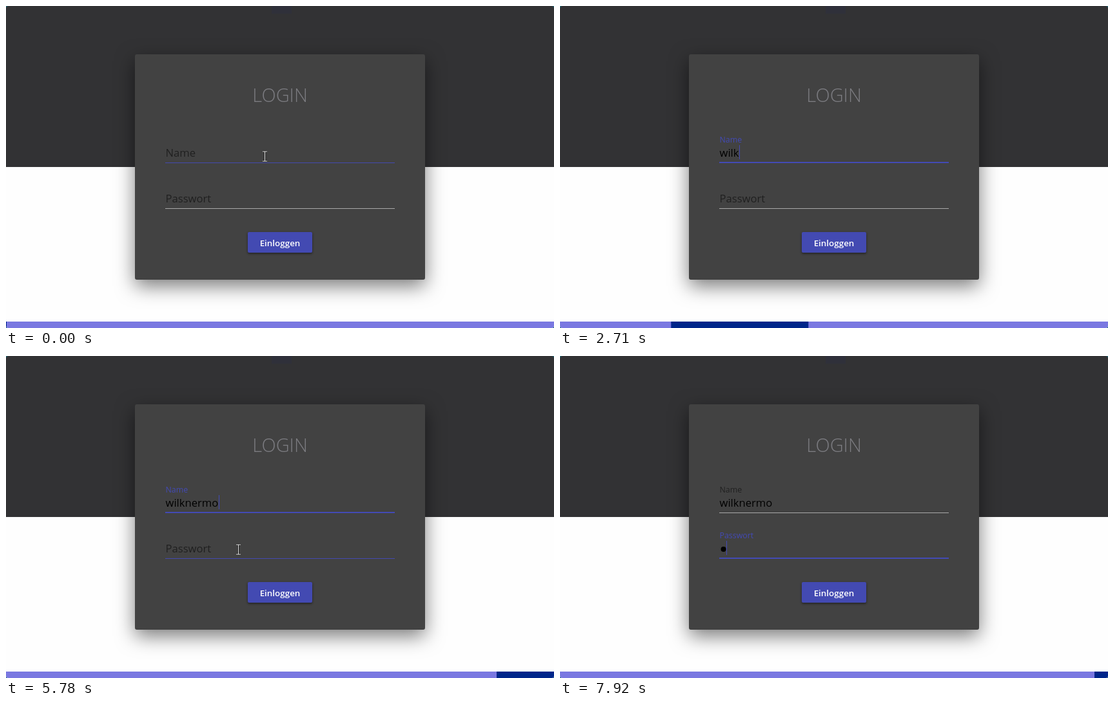
Animation of 850x500 px, one loop 8 s. Source, as an HTML page:

```html
<!DOCTYPE html>
<html lang="de">
<head>
<meta charset="utf-8">
<title>Login</title>
<style>
  html, body { margin: 0; width: 100%; height: 100%; overflow: hidden; background: #176a78; }
  .stage {
    position: relative; width: 850px; height: 500px; overflow: hidden; border-radius: 4px;
    background: linear-gradient(#323234 250px, #fefefe 250px);
  }
  .stage > * { position: absolute; }
  .tab { left: 412px; top: 0; width: 31px; height: 12px; background: #2f303a; }
  .card {
    left: 200px; top: 75px; width: 450px; height: 350px; border-radius: 3px;
    background: #424242; box-shadow: 0 10px 30px rgba(0, 0, 0, .52);
  }
  .button {
    left: 375px; top: 351px; width: 100px; height: 32px; border-radius: 2px; background: #434ab2;
    box-shadow: 0 2px 3px rgba(0, 0, 0, .3), 0 1px 4px rgba(0, 0, 0, .2);
  }
  .progress { left: 0; top: 490px; width: 850px; height: 10px; background: #7a78e1; }
  #bar { position: absolute; left: 0; width: 212.5px; height: 10px; background: #00268a; }
  svg { left: 0; top: 0; }
  text { font-family: "Open Sans", "Noto Sans", sans-serif; font-size: 16.6px; }
  .title { font-size: 29px; font-weight: 300; fill: #7c7c81; }
  .action { font-size: 13.4px; font-weight: 600; fill: #fff; }
  .label { fill: #202020; }
  .line { fill: #a9a9a9; }
  .ripple, .caret { fill: #434ab5; }
  .hover .line { fill: #434ab0; }
  .focus .label { fill: #434ab5; }
</style>
</head>
<body>
<div class="stage">
  <div class="tab"></div>
  <div class="card"></div>
  <div class="button"></div>
  <div class="progress"><div id="bar"></div></div>
  <svg width="850" height="500" viewBox="0 0 850 500">
    <text class="title" x="425" y="149" text-anchor="middle">LOGIN</text>
    <text class="action" x="425" y="373" text-anchor="middle">Einloggen</text>
    <g id="user">
      <text class="label">Name</text>
      <rect class="line" x="247" y="243" width="356" height="1"/>
      <rect class="ripple" y="242" height="2"/>
      <text class="value" x="247.5" y="234"></text>
      <rect class="caret" y="216" width="1" height="22"/>
    </g>
    <g id="pass">
      <text class="label">Passwort</text>
      <rect class="line" x="247" y="314" width="356" height="1"/>
      <rect class="ripple" y="313" height="2"/>
      <circle id="dot" cx="253.5" cy="300" r="4"/>
      <rect class="caret" y="287" width="1" height="22"/>
    </g>
    <g id="mouse" fill="none">
      <path d="M-3.5-7.5H3.5M-3.5 7.5H3.5M0-7.5V7.5" stroke="#2a2a2a" stroke-width="3"/>
      <path d="M-3.5-7.5H3.5M-3.5 7.5H3.5M0-7.5V7.5" stroke="#e4e4e4"/>
    </g>
  </svg>
</div>
<script>
  const LOOP = 8000, FPS = 14, BLINK = 530;
  const NAME = "wilknermo";
  const NAME_KEYS = [1710, 2140, 2430, 2640, 2850, 3070, 3290, 4140, 4570];
  const PASS_KEYS = [7850];
  const FOCUS_NAME = 780, FOCUS_PASS = 6430;

  // [time, left edge] for each sweep of the bar
  const SWEEPS = [
    [[130, -212], [1780, 774], [1910, 850]],
    [[2065, -212], [3500, 643], [3850, 850]],
    [[4150, -212], [4920, 248], [5780, 761], [5918, 850]],
    [[6130, -212], [7140, 325], [7920, 829], [7953, 850]]
  ];
  const MOUSE_X = [[5350, 401.5], [5710, 360.5]];
  const MOUSE_Y = [[5350, 233.5], [5710, 300.5], [6200, 300.5], [6280, 301.5]];

  const $ = id => document.getElementById(id);
  const clamp = v => Math.min(1, Math.max(0, v));
  const mix = (a, b, p) => a + (b - a) * p;
  const ease = p => 1 - (1 - clamp(p)) ** 3;
  const show = (el, on) => el.style.display = on ? "" : "none";

  function track(points, t) {
    const i = points.findIndex(p => p[0] > t);
    if (i === 0) return points[0][1];
    if (i < 0) return points[points.length - 1][1];
    const [a, b] = [points[i - 1], points[i]];
    return mix(a[1], b[1], (t - a[0]) / (b[0] - a[0]));
  }

  function hold(t) {
    const start = k => Math.floor(k * 100 / FPS) * 10;
    let k = Math.floor(t * FPS / 1000);
    if (start(k + 1) <= t) k++;
    return start(k);
  }

  function drawField(group, t, from, to, keys, baseY, hover, caretX) {
    const part = name => group.querySelector("." + name);
    const focused = t >= from && t < to;
    group.classList.toggle("focus", focused);
    group.classList.toggle("hover", hover);

    const up = ease((t - from) / 400);
    part("label").setAttribute("transform",
      `translate(247.5 ${mix(baseY, baseY - 22.5, up)}) scale(${mix(1, .747, up)})`);

    const grow = ease((t - from) / 300), width = mix(178, 356, grow);
    const ripple = part("ripple");
    ripple.setAttribute("x", 425 - width / 2);
    ripple.setAttribute("width", width);
    show(ripple, focused);

    const last = Math.max(from, ...keys.filter(k => k <= t));
    const caret = part("caret");
    caret.setAttribute("x", caretX);
    show(caret, focused && (t - last) % (2 * BLINK) < BLINK);
  }

  const user = $("user"), pass = $("pass"), value = user.querySelector(".value");

  function draw(t) {
    const sweep = SWEEPS.findLast(s => s[0][0] <= t) || SWEEPS[0];
    $("bar").style.transform = `translateX(${track(sweep, t)}px)`;

    value.textContent = NAME.slice(0, NAME_KEYS.filter(k => k <= t).length);
    const end = value.textContent ? value.getComputedTextLength() : 0;
    const typed = t >= PASS_KEYS[0];
    show($("dot"), typed);

    const mouseX = track(MOUSE_X, t), mouseY = track(MOUSE_Y, t);
    const visible = t < NAME_KEYS[0] || t >= MOUSE_X[0][0] && !typed;
    $("mouse").setAttribute("transform", `translate(${mouseX} ${mouseY})`);
    show($("mouse"), visible);

    drawField(user, t, FOCUS_NAME, FOCUS_PASS, NAME_KEYS, 234,
      visible && mouseY < 250, Math.round(248 + end));
    drawField(pass, t, FOCUS_PASS, LOOP, PASS_KEYS, 305,
      visible && mouseY > 270, typed ? 258 : 248);
  }

  const begin = performance.now();
  function tick() {
    draw(hold((performance.now() - begin) % LOOP));
    requestAnimationFrame(tick);
  }
  tick();
</script>
</body>
</html>
```
